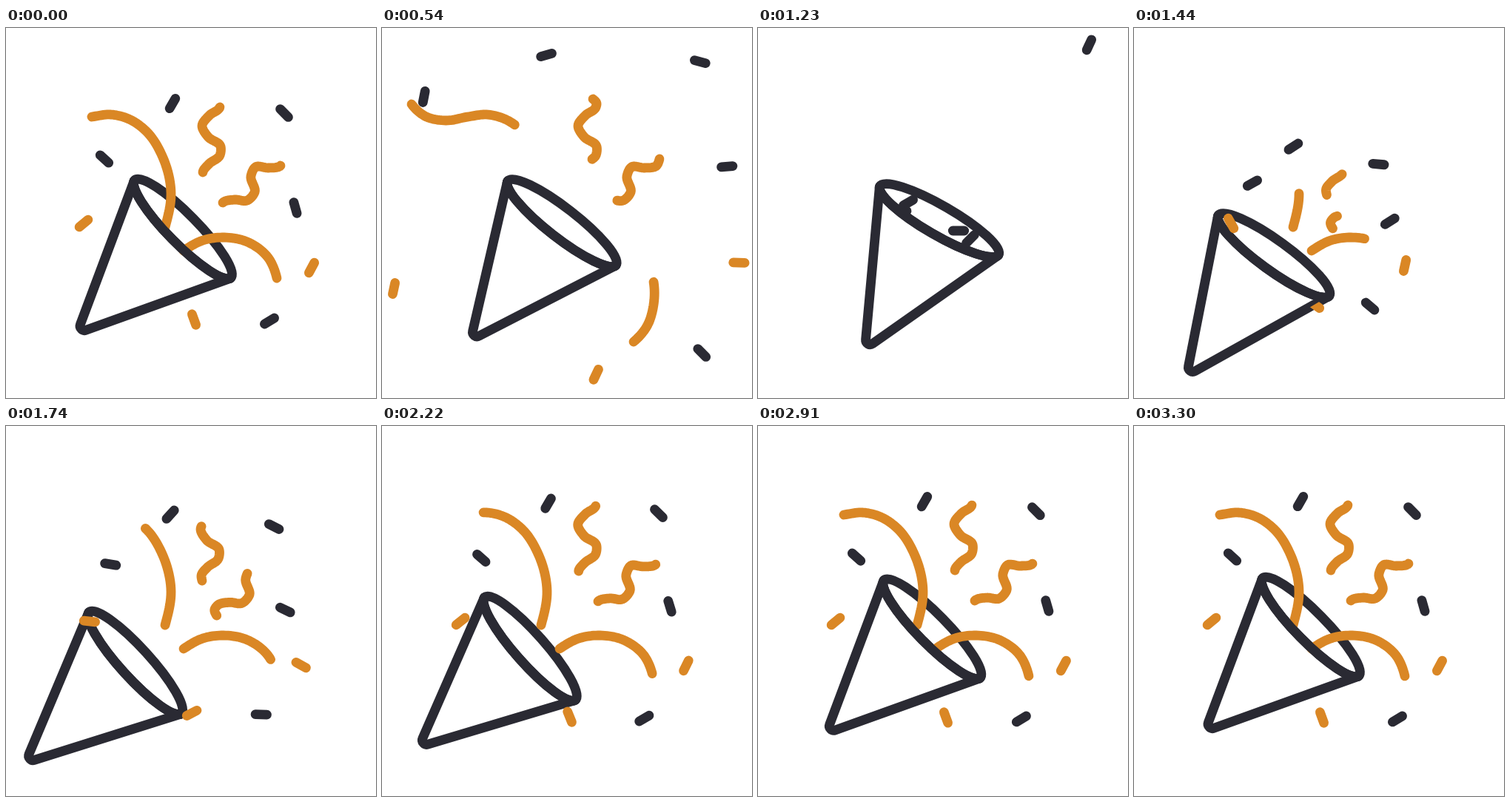
These frames come from a looping animation (500 by 500 pixels, 3360 ms). An HTML page with a canvas:

```html
<!DOCTYPE html>
<html lang="en">
<head>
<meta charset="utf-8">
<title>Party popper</title>
<style>
  html, body { margin: 0; width: 100%; height: 100%; overflow: hidden; background: #fff; }
  canvas { display: block; width: 500px; height: 500px; }
</style>
</head>
<body>
<canvas id="stage" width="500" height="500"></canvas>
<script>
const ctx = document.getElementById('stage').getContext('2d');
const DARK = '#2a2a33', ORANGE = '#da8725';
const LOOP = 3360, STEP = 30, BURST = 1230;
const RIM = 92.6, DEPTH = 20, APEX = 201;

const clamp = v => Math.min(1, Math.max(0, v));
const mix = (a, b, k) => a + (b - a) * k;
const progress = (t, from, to) => clamp((t - from) / (to - from));

function bezier(x1, y1, x2, y2) {
  const curve = (a, b, s) => 3 * (1 - s) * (1 - s) * s * a + 3 * (1 - s) * s * s * b + s * s * s;
  return x => {
    if (x <= 0 || x >= 1) return clamp(x);
    let lo = 0, hi = 1;
    for (let i = 0; i < 24; i++) {
      const mid = (lo + hi) / 2;
      if (curve(x1, x2, mid) < x) lo = mid; else hi = mid;
    }
    return curve(y1, y2, lo);
  };
}

const smooth = bezier(.4, 0, .4, 1);
const snappy = bezier(.3, 0, .3, 1);
const swing = bezier(.25, 0, .3, 1);
const flyOut = bezier(.25, 0, .15, 1);
const settle = bezier(.5, .45, .5, 1);
const unroll = bezier(.1, 0, .4, 1);
const shoot = bezier(.1, 0, .3, 1);
const burst = t => 1 - Math.exp(-Math.max(0, t - BURST) / 252);

// rest and start: [x, y, degrees]; out: pose at 540 ms; gone: end of the flight; from: reappearance
const confetti = [
  { color: DARK, rest: [225, 102, 120], start: [203, 236, 150], out: [222, 35, 164], gone: 990, from: 1230 },
  { color: DARK, rest: [376, 115, 45], start: [271, 274, 0], out: [431, 44, 15], gone: 1260, from: 1230 },
  { color: DARK, rest: [133, 177, 42], start: [195, 252, -38], out: [55, 91, 101], gone: 930, from: 1230 },
  { color: DARK, rest: [391, 243, 74], start: [287, 285, -45], out: [468, 186, -5], gone: 840, from: 1230 },
  { color: DARK, rest: [356, 396, -31], start: [271, 350, 49], out: [434, 440, 45], gone: 870, from: 1260 },
  { color: ORANGE, rest: [105, 264, 140], start: [165, 264, 253], out: [14, 354, 102], gone: 600, from: 1260 },
  { color: ORANGE, rest: [413, 324, 118], start: [305, 317, -101], out: [484, 317, 182], gone: 720, from: 1260 },
  { color: ORANGE, rest: [254, 394, 70], start: [232, 348, -170], out: [290, 470, 115], gone: 690, from: 1260 }
];

// tail and head are positions along the knots: [at rest, at 540 ms]
const streamers = [
  { knots: [[215, 269], [223, 223], [212, 175], [189, 139], [166, 123], [142, 117], [116, 120], [87, 125], [58, 119], [40, 103], [30, 78]],
    tail: [0, 3.45], head: [6, 9], power: 2, shift: [0, 0],
    grow: t => unroll(progress(t, 1260, 2780)) },
  { knots: [[240, 301], [266, 287], [295, 283], [326, 289], [354, 310], [366, 338], [367, 374], [358, 403], [340, 424], [327, 433]],
    tail: [0, 5.15], head: [5, 8], power: 2, shift: [0, 0],
    grow: t => Math.pow(burst(t), 1.2) },
  { knots: [[267, 202], [266, 195], [274, 184], [289, 172], [290, 160], [273, 147], [265, 132], [275, 118], [289, 107], [290, 102], [285, 96]],
    tail: [1, 2.6], head: [8, 10], power: 3, shift: [-15, 54],
    grow: t => shoot(progress(t, 1240, 2260)) },
  { knots: [[292, 250], [289, 242], [293, 236], [309, 232], [326, 233], [336, 222], [331, 200], [337, 188], [355, 189], [371, 186], [375, 177]],
    tail: [2, 3.5], head: [9, 10], power: 3, shift: [-54, 48],
    grow: t => Math.pow(shoot(progress(t, 1240, 2260)), 1.3) }
];

// Curve through the knots, with tangents weighted by the distance between them.
function splinePoint(knots, u) {
  const i = Math.min(knots.length - 2, Math.floor(u)), f = u - i;
  const [a, b, c, d] = [i - 1, i, i + 1, i + 2].map(n => knots[n]);
  const gap = (p, q) => Math.hypot(q[0] - p[0], q[1] - p[1]);
  const span = gap(b, c);
  return [0, 1].map(k => {
    const slope = (p, q) => (q[k] - p[k]) / gap(p, q);
    const tangent = (p, q, r) => {
      const before = gap(p, q), after = gap(q, r);
      return span * (slope(p, q) * after + slope(q, r) * before) / (before + after);
    };
    const chord = c[k] - b[k];
    let m0 = a && tangent(a, b, c), m1 = d && tangent(b, c, d);
    if (!a) m0 = 1.5 * chord - .5 * m1;
    if (!d) m1 = 1.5 * chord - .5 * m0;
    return b[k] + f * (m0 + f * (3 * chord - 2 * m0 - m1 + f * (m0 + m1 - 2 * chord)));
  });
}

function conePose(t) {
  let x, y, deg;
  if (t < 1260) {
    const k = swing(progress(t, 0, 1200));
    x = mix(239, 245, k);
    y = mix(271.5, 260, k);
  } else if (t < 1620) {
    const k = snappy(progress(t, 1260, 1620));
    x = mix(245, 170, k);
    y = mix(260, 323.5, k);
  } else {
    const k = settle(progress(t, 1620, 3300));
    x = mix(170, 239, k);
    y = mix(323.5, 271.5, k);
  }
  if (t < 1260) deg = mix(45.4, 30, smooth(progress(t, 0, 1290)));
  else if (t < 1950) deg = mix(30, 49.2, snappy(progress(t, 1260, 1950)));
  else deg = mix(49.2, 45.4, smooth(progress(t, 1950, 3000)));
  return { x, y, angle: deg * Math.PI / 180 };
}

function inCone(pose, draw) {
  ctx.save();
  ctx.translate(pose.x, pose.y);
  ctx.rotate(pose.angle);
  draw();
  ctx.restore();
}

function drawCone(pose) {
  ctx.strokeStyle = DARK;
  inCone(pose, () => {
    ctx.beginPath();
    ctx.ellipse(0, 0, RIM, DEPTH, 0, 0, Math.PI * 2);
    ctx.stroke();
    ctx.beginPath();
    ctx.moveTo(-RIM, 1);
    ctx.arcTo(0, APEX, RIM, 1, 6);
    ctx.lineTo(RIM, 1);
    ctx.stroke();
  });
}

function drawLip(pose) {
  ctx.strokeStyle = DARK;
  inCone(pose, () => {
    ctx.beginPath();
    ctx.ellipse(0, 0, RIM, DEPTH, 0, 0, Math.PI);
    ctx.stroke();
  });
}

// Keeps pieces that are still inside the cone hidden behind its front.
function behindFront(pose, t, draw) {
  ctx.save();
  if (t >= BURST && t < 1500) {
    ctx.beginPath();
    ctx.rect(0, 0, 500, 500);
    inCone(pose, () => {
      ctx.moveTo(-RIM, 0);
      ctx.ellipse(0, 0, RIM, DEPTH, 0, Math.PI, 0, true);
      ctx.lineTo(0, APEX + 14);
      ctx.closePath();
    });
    ctx.clip('evenodd');
  }
  draw();
  ctx.restore();
}

function drawStreamer(s, t) {
  const end = s.knots.length - 1;
  let tail, head, dx = 0, dy = 0;
  if (t < BURST) {
    const k = t / 540;
    const reach = k < 1 ? Math.sin(k * Math.PI / 2) : 1 + (k - 1) * .6;
    tail = mix(s.tail[0], s.tail[1], Math.pow(k, s.power));
    head = Math.min(end, mix(s.head[0], s.head[1], reach));
  } else {
    const left = 1 - burst(t);
    tail = s.tail[0] * smooth(progress(t, 1700, 2240));
    head = s.head[0] * s.grow(t);
    dx = s.shift[0] * left;
    dy = s.shift[1] * left;
  }
  if (head - tail < .01) return;
  const steps = Math.ceil((head - tail) * 10);
  ctx.strokeStyle = ORANGE;
  ctx.beginPath();
  for (let i = 0; i <= steps; i++) {
    const [x, y] = splinePoint(s.knots, mix(tail, head, i / steps));
    ctx.lineTo(x + dx, y + dy);
  }
  ctx.stroke();
}

function drawPiece(color, from, to, move, spin) {
  const x = mix(from[0], to[0], move), y = mix(from[1], to[1], move);
  const a = mix(from[2], to[2], spin) * Math.PI / 180;
  const cx = 7.7 * Math.cos(a), cy = 7.7 * Math.sin(a);
  ctx.strokeStyle = color;
  ctx.beginPath();
  ctx.moveTo(x - cx, y - cy);
  ctx.lineTo(x + cx, y + cy);
  ctx.stroke();
}

function drawConfetti(p, t) {
  if (t < p.gone) {
    drawPiece(p.color, p.rest, p.out, flyOut(progress(t, 0, 1260)) / .77, Math.pow(t / 540, 1.58));
  }
  if (t >= p.from) {
    drawPiece(p.color, p.start, p.rest, burst(t), smooth(progress(t, 1215, 2325)));
  }
}

function render(t) {
  const pose = conePose(t);
  ctx.fillStyle = '#fff';
  ctx.fillRect(0, 0, 500, 500);
  ctx.lineWidth = 12.8;
  ctx.lineCap = ctx.lineJoin = 'round';
  drawCone(pose);
  behindFront(pose, t, () => streamers.forEach(s => drawStreamer(s, t)));
  drawLip(pose);
  behindFront(pose, t, () => confetti.forEach(p => drawConfetti(p, t)));
}

const begin = performance.now();
function tick() {
  const t = (performance.now() - begin) % LOOP;
  render(Math.min(LOOP - 2 * STEP, Math.floor(t / STEP) * STEP));
  requestAnimationFrame(tick);
}
tick();
</script>
</body>
</html>
```
